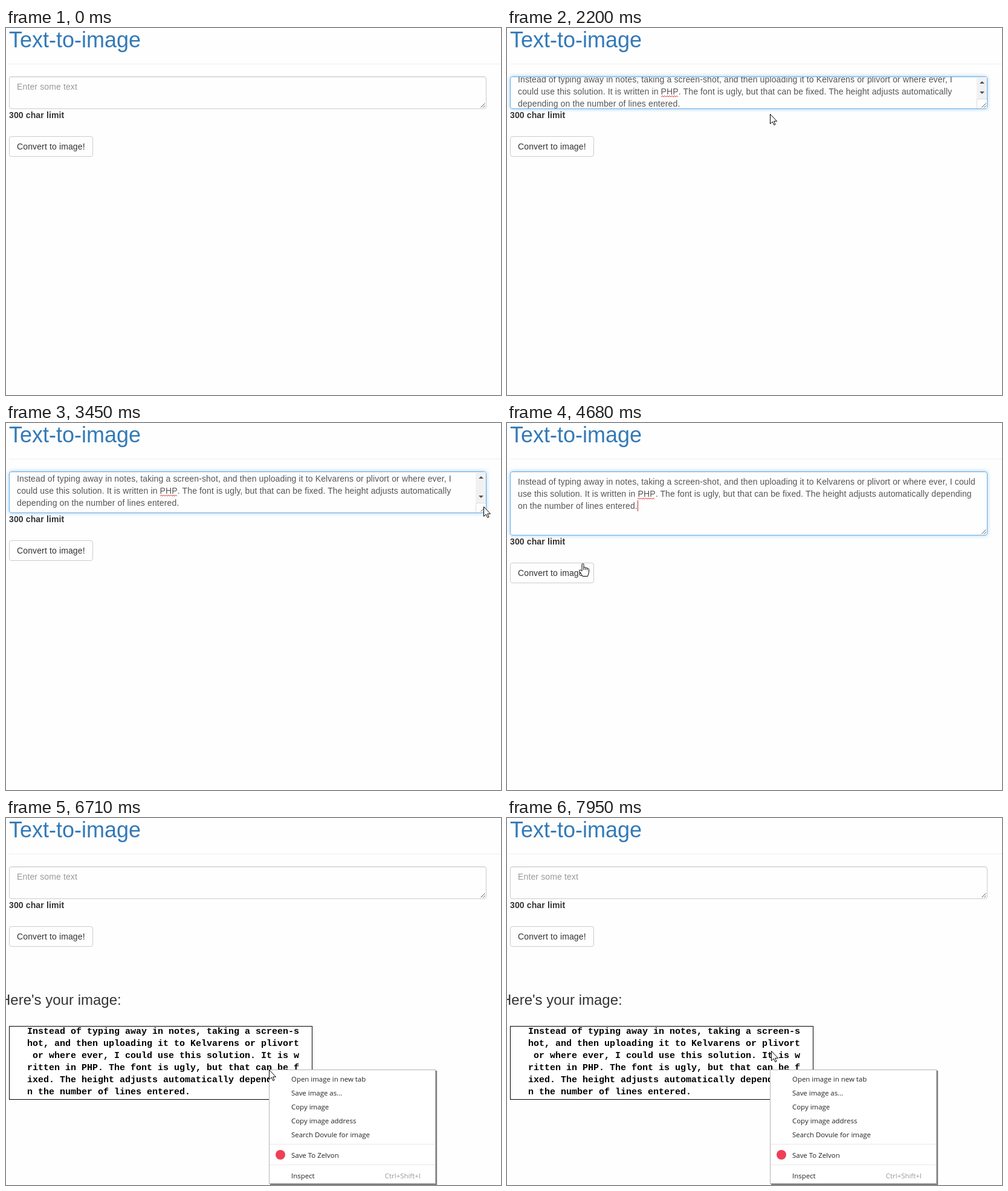
Write an HTML page that moves like this. It is 819x607 px and loops after 8000 ms.

```html
<!DOCTYPE html>
<html lang="en">
<head>
<meta charset="utf-8">
<title>Text-to-image</title>
<style>
html, body { margin: 0; width: 819px; height: 607px; overflow: hidden; background: #fefefe; }
body { position: relative; font: 14px/20px "Liberation Sans", Arial, sans-serif; letter-spacing: .13px; color: #333; }
body > *, #field > *, #menu > * { position: absolute; box-sizing: border-box; }
h1, h3, #image, #menu { letter-spacing: 0; }
h1, h3 { margin: 0; font-weight: 400; white-space: nowrap; }
h1 { left: 5px; top: -1px; font-size: 36px; line-height: 41px; color: #337ab7; }
h3 { left: -10px; top: 287px; font-size: 24px; line-height: 27px; }
#rule { left: 5px; top: 59px; width: 814px; height: 1px; background: #eee; }
#field { left: 5px; top: 80px; width: 790px; border: 1px solid #ccc; border-radius: 4px; overflow: hidden; color: #555; }
.copy { left: 12px; white-space: pre; }
#hint { color: #999; top: 6px; }
.php { position: relative; }
.php svg { position: absolute; left: 0; top: 14px; }
.caret { display: inline-block; width: 1px; height: 18px; margin-right: -1px; vertical-align: -4px; background: #a33; }
#hint .caret { background: #222; }
#bar { right: 0; top: 0; bottom: 16px; width: 17px; background: #f1f1f1; }
#bar i { position: absolute; left: 4.5px; border: solid transparent; border-width: 0 4px; }
#up { top: 7px; border-bottom: 4px solid #505050 !important; }
#down { bottom: 8px; border-top: 4px solid #505050 !important; }
#corner { right: 0; bottom: 0; width: 17px; height: 16px; border: solid #ddd; border-width: 1px 0 0 1px; background: #fefefe; }
#grip { right: 1px; bottom: 1px; }
#limit { left: 5px; font-weight: 700; }
#button { left: 5px; width: 139px; height: 34px; padding: 6px 12px; border: 1px solid #ccc; border-radius: 4px; white-space: nowrap; }
#image { left: 5px; top: 344px; width: 502px; height: 122px; margin: 0; padding-left: 29px; border: 1px solid #000;
  background: #fff; color: #000; font: bold 15px/20px "Liberation Mono", monospace; }
#image span { position: relative; top: -1px; }
#menu { left: 435px; top: 416px; width: 276px; height: 189px; background: #fff; border: 1px solid #b4b4b4;
  box-shadow: 2px 2px 1px rgba(0,0,0,.5); color: #222; font: 11.45px/22px "Open Sans", sans-serif; }
#menu > div { left: 1px; width: 272px; height: 23px; padding-left: 35px; white-space: nowrap; }
#menu hr { left: 0; width: 274px; height: 1px; margin: 0; border: 0; background: #e8e8e8; }
#menu b { left: 10px; top: 132px; width: 16px; height: 16px; border-radius: 50%; background: #ee4056; }
#menu kbd { right: 24px; top: 164px; font: inherit; color: #999; }
#pointer { left: 0; top: 0; overflow: visible; }
#pointer path { fill: #fff; stroke: #000; stroke-linejoin: round; }
</style>
</head>
<body>
<h1>Text-to-image</h1>
<div id="rule"></div>
<div id="field">
  <div id="hint" class="copy"><i class="caret"></i>Enter some text</div>
  <div id="narrow" class="copy"></div>
  <div id="wide" class="copy"></div>
  <div id="bar"><i id="up"></i><i id="down"></i></div>
  <div id="corner"></div>
  <svg id="grip" width="8" height="8"><path d="M.5 7.5 7.5 .5M4.5 7.5 7.5 4.5" stroke="#555" fill="none"/></svg>
</div>
<div id="limit">300 char limit</div>
<div id="button">Convert to image!</div>
<h3 id="heading">Here's your image:</h3>
<pre id="image"></pre>
<div id="menu"></div>
<svg id="pointer" width="20" height="24">
  <g id="arrow"><path d="M.5 .5V16.5L4.2 13 6.8 18.5 9 17.5 6.6 12.2H11.5Z"/></g>
  <g id="beam"><path style="fill:none" d="M-3 -7.5H-.5M1.5 -7.5H4M.5 -7V7M-3 7.5H-.5M1.5 7.5H4"/></g>
  <g id="hand" transform="translate(-6 0)">
    <path d="M5 1.5Q6.5-.5 8 1.5V7Q9.5 5.5 11 7.5 12.5 6.3 13.8 8.3 15.5 7.5 16.5 9.5V14Q16 18 14.5 21.5H6Q4.5 18 1 13.5 0 11 2 11 3.5 11 5 13Z"/>
    <path d="M8 7v4M11 7.5v3.5M13.8 8.5v3"/>
  </g>
</svg>
<script>
const $ = id => document.getElementById(id);
const LOOP = 8000;
const TEXT = 'Instead of typing away in notes, taking a screen-shot, and then uploading it to Kelvarens or plivort ' +
  'or where ever, I could use this solution. It is written in PHP. The font is ugly, but that can be fixed. ' +
  'The height adjusts automatically depending on the number of lines entered.';

// Pointer moves: start, end, steps, then first, control and last point.
const MOVES = [
  [250, 1200, 8, 430, 484, 350, 250, 372, 111],
  [1940, 2350, 4, 275, 118, 500, 165, 812, 148],
  [2630, 3200, 5, 807, 73, 812, 120, 790, 123],
  [3320, 3590, 3, 790, 138, 790, 157, 790, 175],
  [3740, 3860, 2, 540, 190, 400, 197, 228, 204],
  [4140, 4680, 5, 200, 208, 150, 215, 125, 232],
  [4820, 5070, 3, 123, 237, 122, 238, 122, 239],
  [5770, 6160, 4, 190, 219, 636, 330, 435, 416],
  [7110, 7530, 4, 442, 428, 448, 444, 452, 452],
  [7830, 7950, 2, 446, 432, 442, 410, 437, 385]
];
const CARET = [[1200, 2080], [2630, 3050], [3590, 4140], [4680, 4950]];

const squiggle = '<svg width="29" height="4"><path d="M0 3' + 'l2 -2 2 2'.repeat(7) + '" fill="none" stroke="#e33"/></svg>';
const rich = s => s.replace('PHP', `<span class="php">PHP${squiggle}</span>`) + '<i class="caret"></i>';
const breakAt = (...words) => words.reduce((s, w) => s.replace(' ' + w, '\n' + w), TEXT);
$('narrow').innerHTML = rich(breakAt('could', 'depending'));
$('wide').innerHTML = rich(breakAt('use', 'on the'));
$('image').innerHTML = '<span>' + TEXT.match(/.{1,50}/g).join('\n') + '</span>';

const ITEMS = [
  ['Open image in new tab', 4], ['Save image as...', 27], ['Copy image', 50], ['Copy image address', 73],
  ['Search Dovule for image', 96], ['Save To Zelvon', 130], ['Inspect', 164]
];
$('menu').innerHTML = ITEMS.map(([s, y]) => `<div style="top:${y}px">${s}</div>`).join('') +
  '<hr style="top:122px"><hr style="top:156px"><b></b><kbd>Ctrl+Shift+I</kbd>';
const rows = [...$('menu').querySelectorAll('div')];
const carets = [...document.querySelectorAll('.caret')];

const within = (t, a, b) => t >= a && t < b;
const show = (id, on) => $(id).style.visibility = on ? 'visible' : 'hidden';
const mix = (a, b, u) => Math.round(a + (b - a) * u);

function pointerAt(t) {
  const move = MOVES.filter(m => t >= m[0]).pop();
  if (!move) return null;
  const [start, end, n, ax, ay, bx, by, cx, cy] = move;
  const u = Math.min(n - 1, Math.floor((t - start) * (n - 1) / (end - start) + 1e-6)) / (n - 1);
  const curve = (a, b, c) => Math.round((1 - u) ** 2 * a + 2 * u * (1 - u) * b + u * u * c);
  return { x: curve(ax, bx, cx), y: curve(ay, by, cy) };
}

function focusAt(t) {
  if (within(t, 1360, 4950)) return 1;
  return within(t, 1200, 1360) ? .3 : within(t, 4950, 5070) ? .4 : 0;
}

function drawField(t, height) {
  const filled = within(t, 1660, 5230), scroll = filled && height < 74;
  const shift = Math.min(12, 74 - height);
  show('hint', !filled);
  show('narrow', scroll);
  show('wide', filled && !scroll);
  for (const id of ['bar', 'corner']) $(id).style.display = scroll ? 'block' : 'none';
  $('narrow').style.top = 6 - shift + 'px';
  $('wide').style.top = '6px';
  const blink = CARET.some(([a, b]) => within(t, a, b));
  for (const c of carets) c.style.opacity = blink ? 1 : 0;

  const f = focusAt(t), style = $('field').style;
  style.height = height + 'px';
  style.borderColor = `rgb(${mix(204, 102, f)},${mix(204, 175, f)},${mix(204, 233, f)})`;
  style.boxShadow = `inset 0 1px 1px rgba(0,0,0,.075), 0 0 6px rgba(102,175,233,${.6 * f})`;
}

function drawButton(t, height) {
  const pressed = within(t, 4950, 5230), hover = within(t, 4820, 5230), style = $('button').style;
  $('limit').style.top = 80 + height + 'px';
  style.top = 125 + height + 'px';
  style.background = hover ? '#e6e6e6' : '#fefefe';
  style.borderColor = hover ? '#adadad' : '#ccc';
  style.boxShadow = pressed ? 'inset 0 3px 5px rgba(0,0,0,.125)' : 'none';
}

function drawPointer(t, p, height) {
  let kind = '';
  if (p) {
    const inText = p.x > 5 && p.x < 777 && p.y > 80 && p.y < 80 + height;
    kind = within(t, 4680, 5770) ? 'hand' : inText ? 'beam' : 'arrow';
    $('pointer').style.transform = `translate(${p.x}px,${p.y}px)`;
  }
  for (const id of ['arrow', 'beam', 'hand']) show(id, id === kind);
}

function draw(t) {
  const p = pointerAt(t);
  const height = within(t, 3320, 5230) ? (t < 3740 ? p.y - 69 : 106) : 54;
  drawField(t, height);
  drawButton(t, height);
  show('heading', t >= 5230);
  show('image', t >= 5370);
  show('menu', t >= 6710);
  const hot = p ? Math.floor((p.y - 421) / 23) : -1;
  rows.forEach((row, i) => row.style.background = i === hot ? '#ebebeb' : 'none');
  drawPointer(t, p, height);
}

const origin = performance.now();
function tick() {
  draw((performance.now() - origin) % LOOP);
  requestAnimationFrame(tick);
}
tick();
</script>
</body>
</html>
```
